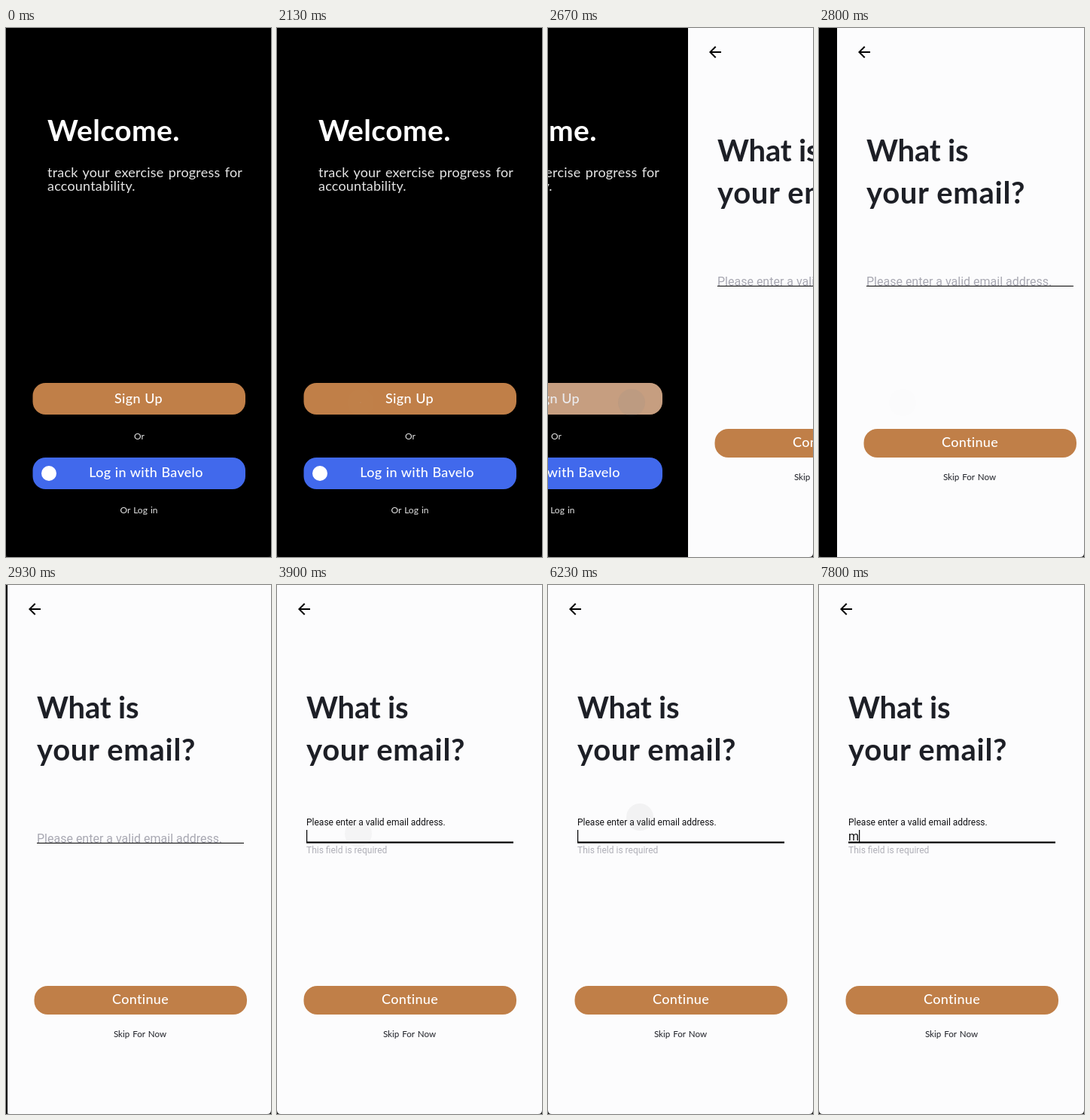
Write an HTML page that moves like this. It is 352 px wide and 702 px high and loops after 8 s.

```html
<!DOCTYPE html>
<html lang="en">
<head>
<meta charset="utf-8">
<title>Sign-up flow</title>
<style>
  html, body { margin: 0; width: 100%; height: 100%; overflow: hidden; background: #000; }
  svg { display: block; width: 352px; height: 702px; }
  text { white-space: pre; }
  .lato { font-family: Lato, sans-serif; }
  .roboto { font-family: Roboto, sans-serif; }
  .title { font-size: 40px; font-weight: 700; }
  .intro { font-size: 18px; letter-spacing: .2px; word-spacing: 1.5px; }
  .action { font-size: 18px; font-weight: 500; letter-spacing: .3px; word-spacing: .5px; text-anchor: middle; }
  .small { font-size: 12px; word-spacing: 1px; text-anchor: middle; }
</style>
</head>
<body>
<svg viewBox="0 0 352 702">
  <defs>
    <clipPath id="buttonClip"><rect x="35.5" y="471" width="282.5" height="42" rx="17"/></clipPath>
  </defs>

  <g id="welcome" class="lato" fill="#e4e4e4">
    <rect width="352" height="702" fill="#000"/>
    <text class="title" x="55" y="149.5" style="font-size:39px" letter-spacing=".4" fill="#fff">Welcome.</text>
    <text class="intro" x="55" y="198">track your exercise progress for</text>
    <text class="intro" x="55" y="216">accountability.</text>
    <rect x="35.5" y="471" width="282.5" height="42" rx="17" fill="#c07f48"/>
    <text class="action" x="176" y="498" fill="#fff">Sign Up</text>
    <g clip-path="url(#buttonClip)"><circle id="splash" cx="111" cy="497" fill="#cdcdd4"/></g>
    <text class="small" x="177" y="546">Or</text>
    <rect x="35.5" y="570" width="282.5" height="42" rx="17" fill="#4169ec"/>
    <circle cx="57" cy="591" r="10" fill="#fff"/>
    <text class="action" x="186" y="596" fill="#fff">Log in with Bavelo</text>
    <text class="small" x="176.5" y="644">Or Log in</text>
  </g>

  <g id="email" class="lato" fill="#1d1f26">
    <rect width="352" height="702" fill="#fcfcfd"/>
    <path transform="translate(24 20)" fill="#000" d="M20 11H7.83l5.59-5.59L12 4l-8 8 8 8 1.41-1.41L7.83 13H20v-2z"/>
    <text class="title" x="39" y="177" letter-spacing="-.2">What is</text>
    <text class="title" x="39" y="233" letter-spacing=".7">your email?</text>
    <g class="roboto">
      <text id="label" x="39">Please enter a valid email address.</text>
      <text id="helper" x="39" y="355.5" font-size="12" fill="#b0b0b8">This field is required</text>
      <text id="typed" x="39" y="338.5" font-size="16" fill="#111"></text>
      <rect id="underline" x="39" width="275" fill="#000"/>
      <rect id="cursor" y="325" width="1.2" height="16" fill="#000"/>
    </g>
    <rect x="35.5" y="532" width="282.5" height="38" rx="18" fill="#c07f48"/>
    <text class="action" x="176.5" y="556" fill="#fff">Continue</text>
    <text class="small" x="176" y="600" style="font-size:11.6px">Skip For Now</text>
  </g>

  <circle id="touch" r="18" fill="#808080"/>
  <path d="M0 697Q0 702 5 702H0ZM352 697Q352 702 347 702H352Z" fill="#1a1a1a"/>
</svg>

<script>
const LOOP = 8000;
const SLIDE_START = 2597;
const el = Object.fromEntries([...document.querySelectorAll('[id]')].map(node => [node.id, node]));

const taps = [
  { x: 111, y: 497, from: 2130, to: 2850 },
  { x: 108, y: 330, from: 3730, to: 4030 },
  { x: 122, y: 308, from: 6030, to: 6370 },
];
const cursorOn = [[3730, 4200], [4700, 5030], [6070, 6570], [6830, 7600], [7800, LOOP]];

const clamp = v => Math.min(1, Math.max(0, v));
const progress = (t, from, duration) => clamp((t - from) / duration);
const ease = p => p * p * (3 - 2 * p);
const mix = (a, b, p) => a + (b - a) * p;
const set = (node, attributes) => {
  for (const name in attributes) node.setAttribute(name, attributes[name]);
};

// Rises on each focus and falls on blur.
const focusAmount = (t, duration, blurDuration) =>
  t < 5030 ? ease(progress(t, 3730, duration))
  : t < 6030 ? 1 - ease(progress(t, 5030, blurDuration))
  : ease(progress(t, 6050, duration));

const typedText = t => t < 6830 ? '' : t >= 7100 && t < 7800 ? 'mo' : 'm';

function drawSlide(t) {
  // Critically damped spring.
  const s = Math.max(0, t - SLIDE_START) * 0.0215;
  const x = Math.round(352 * (1 + s) * Math.exp(-s));
  set(el.welcome, { transform: `translate(${x - 352} 0)` });
  set(el.email, { transform: `translate(${x} 0)` });
}

function drawTouch(t) {
  const tap = taps.find(({ from, to }) => t >= from && t < to);
  const strength = tap ? progress(t, tap.from, 80) * clamp((tap.to - t) / 250) ** 2 : 0;
  set(el.touch, { cx: tap ? tap.x : 0, cy: tap ? tap.y : 0, opacity: 0.25 * strength });
  set(el.splash, {
    r: 220 * progress(t, 2130, 480),
    opacity: 0.4 * (1 - progress(t, 2700, 250)),
  });
}

function drawField(t) {
  const focus = focusAmount(t, 160, 200);
  const shade = [mix(168, 17, focus), mix(168, 17, focus), mix(178, 20, focus)].map(Math.round);
  set(el.label, { y: mix(342, 319, focus), 'font-size': mix(16, 12, focus), fill: `rgb(${shade})` });
  set(el.helper, { opacity: focusAmount(t, 170, 340) });
  set(el.underline, { y: mix(342, 340.5, focus), height: mix(1, 2.2, focus) });

  const text = typedText(t);
  if (el.typed.textContent !== text) el.typed.textContent = text;
  const width = text ? el.typed.getComputedTextLength() : 0;
  const visible = cursorOn.some(([from, to]) => t >= from && t < to);
  set(el.cursor, { x: 39 + width, opacity: visible ? 1 : 0 });
}

function draw() {
  const t = performance.now() % LOOP;
  drawSlide(t);
  drawTouch(t);
  drawField(t);
  requestAnimationFrame(draw);
}
draw();
</script>
</body>
</html>
```
